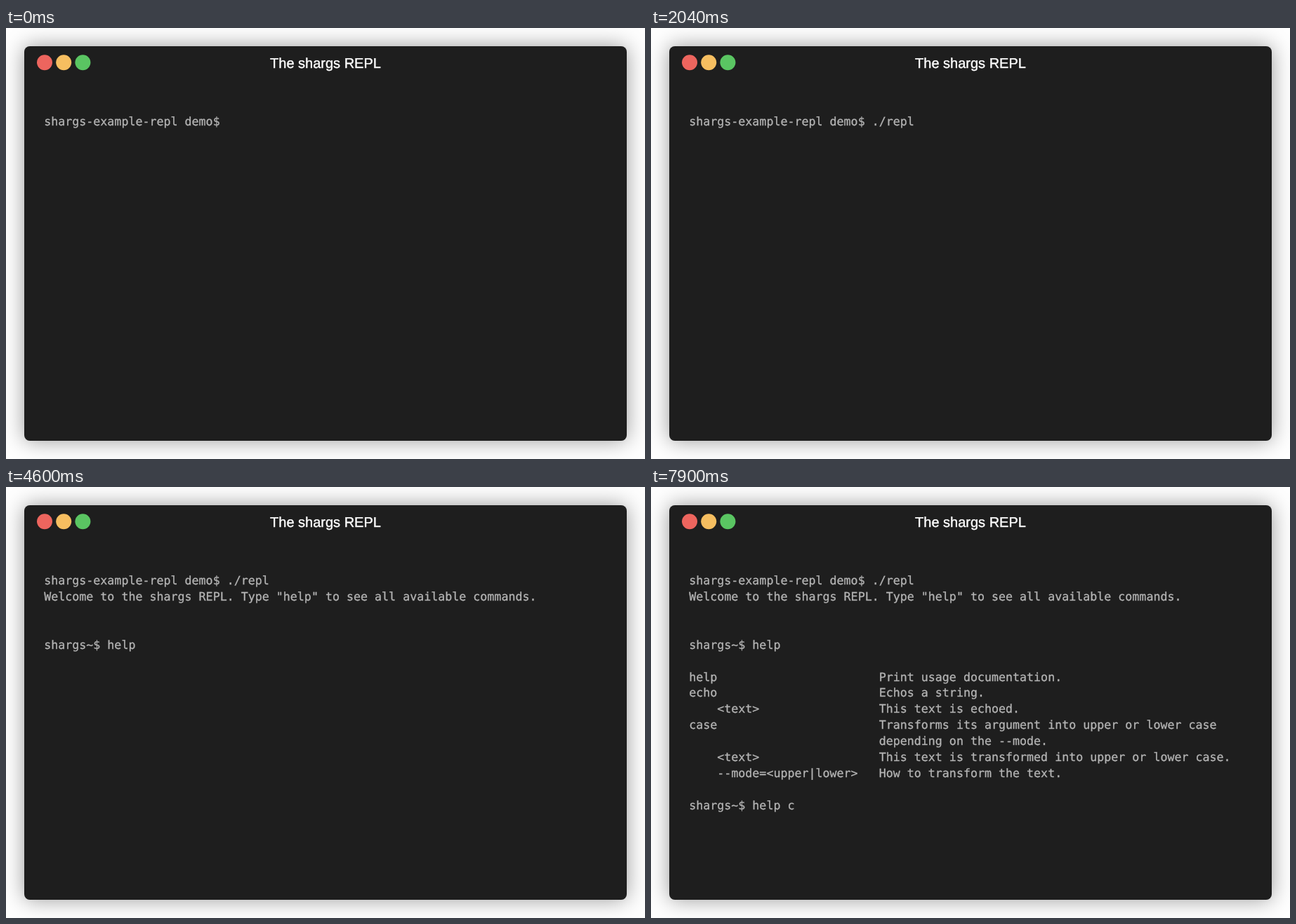
An HTML page that plays this animation: 910x615 px, repeating every 8000 ms.

```html
<!DOCTYPE html>
<html>
<head>
<meta charset="utf-8">
<style>
  html, body { margin: 0; width: 100%; height: 100%; overflow: hidden; background: #fefefe; }
  .window {
    position: absolute; left: 26px; top: 26px; width: 858px; height: 563px;
    border-radius: 8px; background: #1e1e1e; box-shadow: 0 0 30px rgba(0, 0, 0, .4);
  }
  svg { position: absolute; left: 0; top: 0; text-rendering: geometricPrecision; }
  .title {
    font: 20px "Liberation Sans", Arial, sans-serif; text-anchor: middle;
    fill: #fff; stroke: #fff; stroke-width: .4px;
  }
  .row {
    font: 16.65px "DejaVu Sans Mono", monospace; white-space: pre;
    fill: #b4b4b4; stroke: #b4b4b4; stroke-width: .3px;
  }
</style>
</head>
<body>
<div class="window"></div>
<svg width="910" height="615">
  <circle cx="55" cy="49.2" r="11" fill="#ed655e"/>
  <circle cx="82.2" cy="49.2" r="11" fill="#f6be60"/>
  <circle cx="109.4" cy="49.2" r="11" fill="#5ac562"/>
  <text class="title" x="455" y="57">The shargs REPL</text>
  <g id="screen"></g>
</svg>
<script>
const LOOP = 8000, LEFT = 54.2, BASELINE = 139.1, PITCH = 22.9;
const screen = document.getElementById('screen');

const entry = (name, info) => name.padEnd(27) + info;
const welcome = '\nWelcome to the shargs REPL. Type "help" to see all available commands.\n\n\nshargs~$ ';
const usage = [
  '\n',
  entry('help', 'Print usage documentation.'),
  entry('echo', 'Echos a string.'),
  entry('    <text>', 'This text is echoed.'),
  entry('case', 'Transforms its argument into upper or lower case'),
  entry('', 'depending on the --mode.'),
  entry('    <text>', 'This text is transformed into upper or lower case.'),
  entry('    --mode=<upper|lower>', 'How to transform the text.'),
  '',
  'shargs~$ '
].join('\n');

// Each event appends its text to the terminal at the given time.
const events = [[0, 'shargs-example-repl demo$ ']];
const type = (text, times) => times.forEach((time, i) => events.push([time, text[i]]));
type('./repl', [500, 550, 1000, 1210, 1380, 1530]);
events.push([2140, welcome]);
type('help', [4140, 4270, 4420, 4600]);
events.push([5100, usage]);
type('help c', [7100, 7250, 7410, 7580, 7740, 7900]);

const rows = Array.from({ length: 15 }, (_, i) => {
  const row = document.createElementNS('http://www.w3.org/2000/svg', 'text');
  row.setAttribute('class', 'row');
  row.setAttribute('x', LEFT);
  row.setAttribute('y', BASELINE + i * PITCH);
  return screen.appendChild(row);
});

let shown;
function draw(now) {
  const time = now % LOOP;
  const output = events.filter(([start]) => start <= time).map(([, text]) => text).join('');
  if (output !== shown) {
    const lines = output.split('\n');
    rows.forEach((row, i) => row.textContent = lines[i] || '');
    shown = output;
  }
  requestAnimationFrame(() => draw(performance.now()));
}
draw(performance.now());
</script>
</body>
</html>
```
